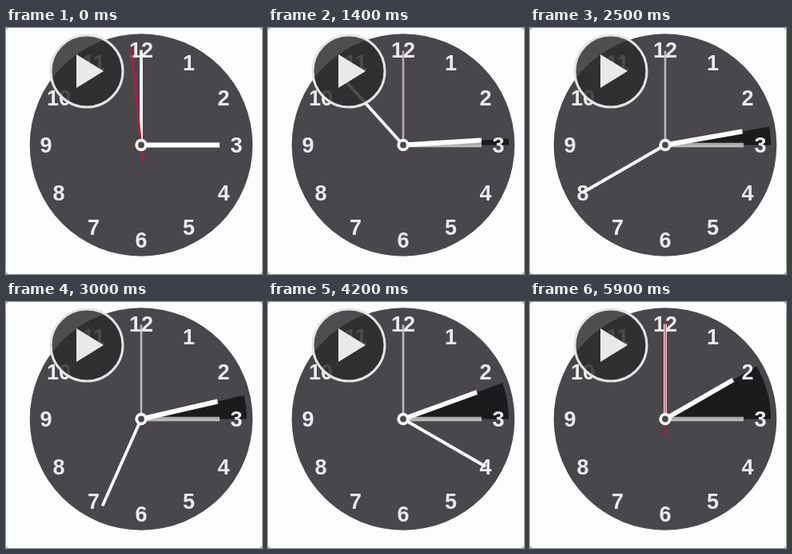
An HTML page for the animation above (6000 ms loop, 320 px wide and 308 px high).

```html
<!DOCTYPE html>
<html lang="en">
<head>
<meta charset="utf-8">
<title>Clock turning back one hour</title>
<style>
  html, body { margin: 0; width: 100%; height: 100%; overflow: hidden; background: #8b8b8d; }
  svg { display: block; width: 100vw; height: 100vh; }
  text { font: bold 27px "Liberation Sans", Arial, sans-serif; fill: #ebebec; text-anchor: middle; }
</style>
</head>
<body>
<svg viewBox="0 0 320 308">
  <rect width="320" height="308" rx="4" fill="#fefdfe"/>
  <g transform="translate(169 146.5)">
    <circle r="139.3" fill="#49474b"/>
    <path id="wedge" fill="#1b1a1d"/>
    <g id="numbers"></g>
    <g stroke="#fff" opacity=".62">
      <path d="M0 0V-118" stroke-width="2.6"/>
      <path d="M0 0H98" stroke-width="5.5"/>
    </g>
    <path id="hour" d="M0 0V-98" stroke="#fff" stroke-width="6"/>
    <path id="minute" d="M0 0V-119" stroke="#fff" stroke-width="3.8"/>
    <path id="second" d="M0 20V-122" stroke="#c3143f" stroke-width="2.4"/>
    <circle r="5.8" fill="#49474b" stroke="#fff" stroke-width="3.8"/>
  </g>
  <circle cx="101" cy="54" r="45" fill="#2d2b2e" fill-opacity=".84"/>
  <circle cx="101" cy="54" r="45" fill="none" stroke="#e4e4e5" stroke-width="3"/>
  <path d="M88 33V75L122 54Z" fill="#e9e9ea"/>
</svg>
<script>
const LOOP = 6000, STEP = 100;
const $ = id => document.getElementById(id);
const clamp = (v, lo, hi) => Math.min(hi, Math.max(lo, v));
const polar = (deg, r) => {
  const a = deg * Math.PI / 180;
  return [r * Math.sin(a), -r * Math.cos(a)];
};
const turn = (id, deg) => $(id).setAttribute("transform", `rotate(${deg})`);

for (let n = 1; n <= 12; n++) {
  const [x, y] = polar(n * 30, 119);
  const label = document.createElementNS("http://www.w3.org/2000/svg", "text");
  label.setAttribute("x", x);
  label.setAttribute("y", y + 9.6);
  label.textContent = n;
  $("numbers").append(label);
}

function draw(ms) {
  const n = Math.floor((ms % LOOP) / STEP);

  // One fast backward sweep of the second hand, then sixty minute ticks.
  const ticks = clamp(Math.floor((n - 8) * 6 / 5), 0, 60);
  const sweep = n < 8 ? 6 + n * 44.25 : 0;
  const back = ticks / 2;

  turn("second", -sweep);
  turn("minute", -ticks * 6);
  turn("hour", 90 - back);

  const out = clamp((14.6 - n) / 6.6, 0, 1);
  const back_in = clamp((n - 56) / 5, 0, 1);
  $("second").setAttribute("opacity", Math.max(out, back_in));

  const [x, y] = polar(90 - back, 132);
  $("wedge").setAttribute("d", back ? `M0 0H132A132 132 0 0 0 ${x} ${y}Z` : "M0 0");
}

const start = performance.now();
function tick() {
  draw(performance.now() - start);
  requestAnimationFrame(tick);
}
tick();
</script>
</body>
</html>
```
